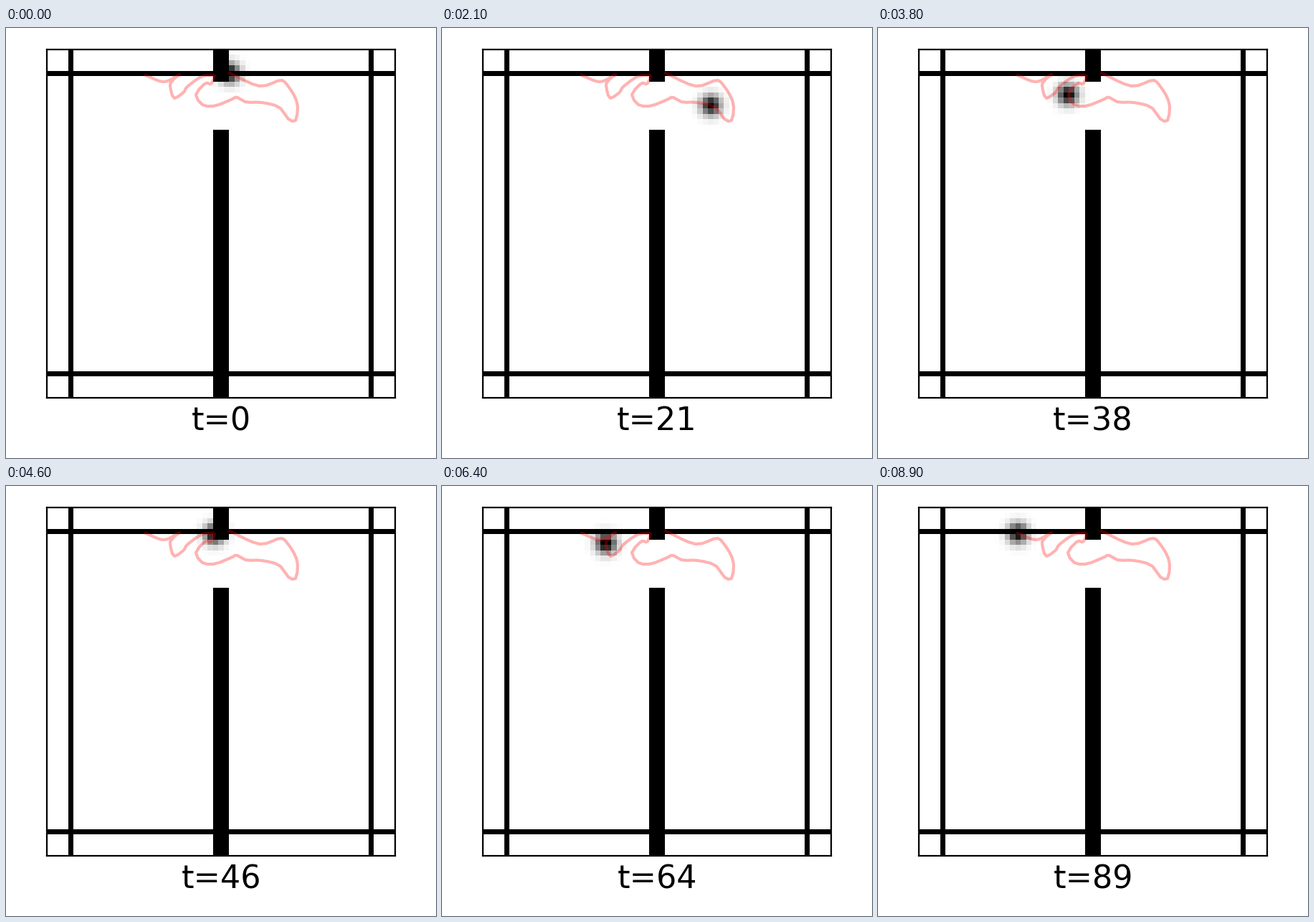
Animation of 600 by 600 pixels, one loop 9 s. Source, as a matplotlib script:

```python
import numpy as np
import matplotlib.pyplot as plt
from matplotlib.animation import FuncAnimation

FRAMES, INTERVAL = 90, 100
CELLS, SIGMA = 65, 1.3
LEFT, TOP, SIDE = 57, 30, 486          # room on the stage, in pixels
CELL = SIDE / CELLS

# Turning points of the walk: step, x, y (stage pixels)
KEYS = np.array([
    (0, 312, 63), (4, 354, 81), (8, 385, 73), (10, 392, 79), (14, 407, 110),
    (16, 404, 129), (18, 394, 127), (20, 383, 112), (23, 357, 104),
    (26, 334, 103), (28, 323, 97), (31, 314, 100), (34, 289, 109),
    (36, 274, 107), (38, 265, 93), (40, 276, 79), (44, 287, 77),
    (46, 291, 67), (48, 285, 66), (50, 275, 67), (54, 254, 81), (59, 245, 92),
    (61, 235, 98), (64, 229, 80), (67, 232, 74), (78, 240, 66), (84, 219, 75),
    (89, 195, 66),
])


def smooth_path(t, times, points):
    """Cubic Hermite curve through the points at the given times."""
    slopes = np.gradient(points, times, axis=0)
    i = np.clip(np.searchsorted(times, t, side="right") - 1, 0, len(times) - 2)
    span = (times[i + 1] - times[i])[:, None]
    u = (t - times[i])[:, None] / span
    ease = u * u * (3 - 2 * u)
    return (points[i] * (1 - ease) + points[i + 1] * ease
            + span * u * (1 - u) * (slopes[i] * (1 - u) - slopes[i + 1] * u))


dots = smooth_path(np.arange(FRAMES), KEYS[:, 0], KEYS[:, 1:].astype(float))

walls = np.zeros((CELLS, CELLS))
walls[:, 31:34] = 1
walls[6:15, 31:34] = 0                 # door
walls[[4, 60], :] = 1
walls[:, [4, 60]] = 1
rows, cols = np.mgrid[:CELLS, :CELLS]


def room(step):
    x, y = (dots[step] - (LEFT, TOP)) / CELL - 0.5
    dot = np.exp(-((cols - x) ** 2 + (rows - y) ** 2) / (2 * SIGMA ** 2))
    return np.maximum(walls, dot / dot.max())


fig = plt.figure(figsize=(3, 3), dpi=200, facecolor="white")
ax = fig.add_axes([LEFT / 600, 1 - (TOP + SIDE) / 600, SIDE / 600, SIDE / 600])
image = ax.imshow(room(0), cmap="gray_r", vmin=0, vmax=1,
                  interpolation="nearest",
                  extent=(LEFT, LEFT + SIDE, TOP + SIDE, TOP))
ax.plot(*dots.T, color="red", alpha=0.3, lw=1.5)
ax.set(xlim=(LEFT, LEFT + SIDE), ylim=(TOP + SIDE, TOP), xticks=[], yticks=[])
label = ax.set_xlabel("t=0", fontsize=16, family="DejaVu Sans")


def update(step):
    image.set_data(room(step))
    label.set_text(f"t={step}")
    return image, label


anim = FuncAnimation(fig, update, frames=FRAMES, interval=INTERVAL,
                     repeat=True, repeat_delay=0)
plt.show()
```
